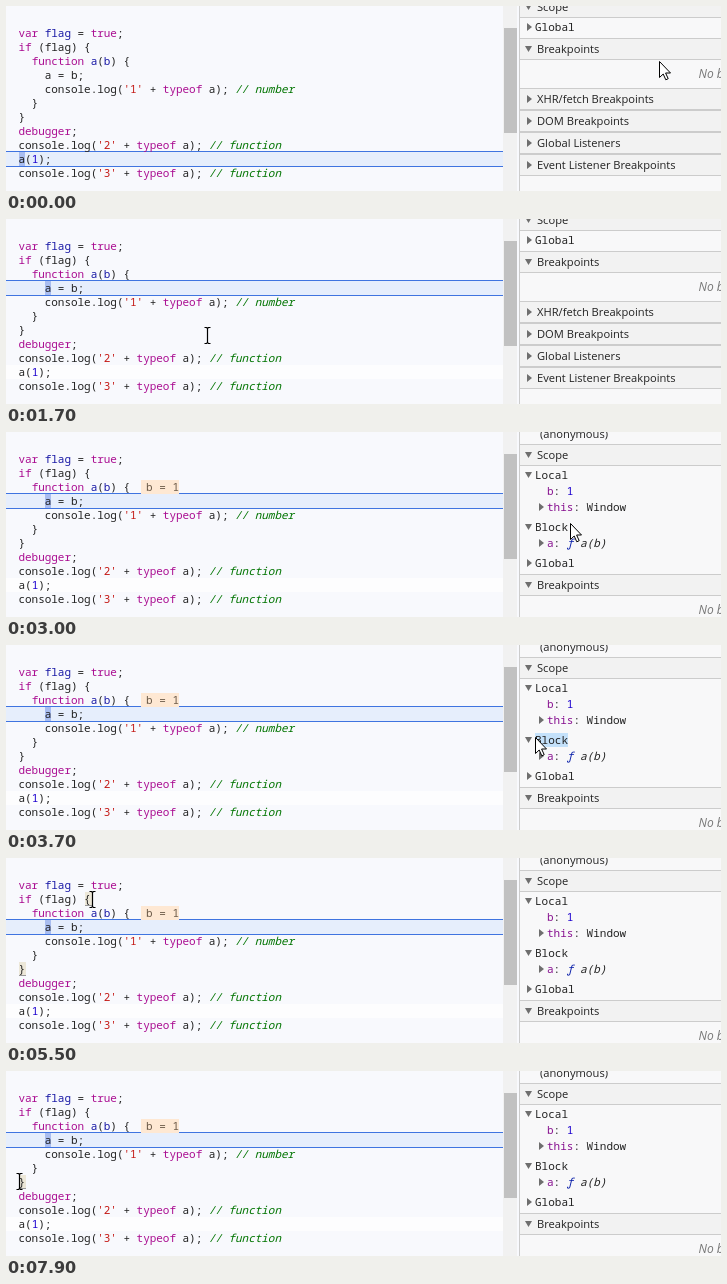
Animation of 715x185 px, one loop 8 s. Source, as an HTML page:

```html
<!DOCTYPE html>
<html lang="en">
<head>
<meta charset="utf-8">
<title>Stepping through a function in a block</title>
<style>
  html, body { margin: 0; width: 100%; height: 100%; overflow: hidden; background: #f8f9fd; }
  #stage { position: relative; width: 715px; height: 185px; overflow: hidden; color: #222; }
  #stage div, pre, svg { position: absolute; }
  pre, .mono { margin: 0; font: 11px/14px "Noto Sans Mono", monospace; white-space: pre; }
  pre { left: 12.5px; top: 20px; letter-spacing: -.04px; }
  .comment { color: #007400; font-style: italic; }
  .string { color: #c41a16; }
  .keyword { color: #aa0d91; }
  .number { color: #1c00cf; }
  .def { color: #1a1aa6; }
  .name { color: #881391; }
  .fn { color: #0d22aa; font-style: italic; }
  #exec { left: 0; width: 497px; height: 14px; background: #e6eefc; border: solid #3f74e0; border-width: 1px 0; }
  #token { top: 0; width: 6px; height: 14px; background: #a9bdf0; }
  #past { left: 0; top: 146px; width: 497px; height: 14px; background: #fdfdfe; }
  .brace { width: 7px; height: 13px; background: #ece7d8; border-bottom: 1px solid #999; }
  .picked { background: #c4e1fa; }
  #value { left: 135px; top: 48px; width: 33px; padding-left: 5px; background: #fee8d3; color: #6b5a48; }
  #track { left: 497px; top: 0; width: 14px; height: 185px; background: #f1f1f1; }
  #thumb { left: 1px; top: 22px; width: 13px; height: 105px; background: #c1c1c1; }
  #panel { left: 513px; top: 0; width: 202px; height: 185px; overflow: hidden; border-left: 1px solid #ccc; box-sizing: border-box; background: #f8f8f9; }
  #panel > div { left: -514px; width: 715px; }
  .head { left: 514px; width: 201px; height: 20px; background: #f2f2f2; border: solid #ccc; border-width: 1px 0; }
  .sans { font: 11.15px/14px "Open Sans", sans-serif; white-space: pre; }
  .note { font-size: 12px; font-style: italic; color: #777; }
  .tri { background: #6e6e6e; }
  .right { width: 5px; height: 8px; clip-path: polygon(0 0, 100% 50%, 0 100%); }
  .down { width: 7px; height: 6px; clip-path: polygon(0 0, 100% 0, 50% 100%); }
  svg { left: 0; top: 0; overflow: visible; }
</style>
</head>
<body>
<div id="stage">
  <div id="past"></div>
  <div id="exec"><div id="token"></div></div>
  <div class="brace" style="left:79px;top:34px"></div>
  <div class="brace" style="left:13px;top:104px"></div>
  <div id="openPick" class="picked" style="left:78px;top:34px;width:7px;height:14px"></div>
  <pre id="code"></pre>
  <div id="value" class="mono">b = 1</div>
  <div id="track"><div id="thumb"></div></div>
  <div id="panel">
    <div id="top"></div>
    <div id="locals"><div id="blockPick" class="picked" style="top:88px;height:14px"></div></div>
    <div id="rest"></div>
  </div>
  <svg width="1" height="1" fill="none" stroke="#000">
    <path id="arrow" d="M0 0V16L3.7 12.5L6.3 18.3L8.7 17.2L6.1 11.5H11Z" fill="#fff"/>
    <path id="beam" d="M-3 -8H-1L0 -7L1 -8H3M0 -7V7M-3 8H-1L0 7L1 8H3" stroke-width="1.2"/>
  </svg>
</div>
<script>
const $ = id => document.getElementById(id);
const source = `var flag = true;
if (flag) {
  function a(b) {
    a = b;
    console.log('1' + typeof a); // number
  }
}
debugger;
console.log('2' + typeof a); // function
a(1);
console.log('3' + typeof a); // function`;
const kinds = ['comment', 'string', 'keyword', 'def', 'number'];
$('code').innerHTML = source.replace(
  /(\/\/.*)|('.')|\b(var|true|if|function|typeof|debugger)\b|((?<=var |function |a\()[a-z]+)|(\d)/g,
  (text, ...groups) => `<span class="${kinds[groups.findIndex(g => g === text)]}">${text}</span>`);

// Sidebar pieces; y is the middle of the row.
const add = (parent, cls, x, y, html = '') =>
  $(parent).insertAdjacentHTML('beforeend', `<div class="${cls}" style="left:${x}px;top:${y}px">${html}</div>`);
const label = (parent, cls, x, y, html) => add(parent, cls, x, y - 7, html);
const triangle = (parent, dir, x, y) =>
  dir === 'down' ? add(parent, 'tri down', x - 4, y - 3) : add(parent, 'tri right', x - 2, y - 4);
function header(parent, y, text, dir = 'right') {
  add(parent, 'head', 514, y - 11);
  triangle(parent, dir, 523, y);
  label(parent, 'sans', 531, y, text);
}
function entry(parent, x, y, html, dir) {
  if (dir) triangle(parent, dir, x - 6, y);
  label(parent, 'mono', x, y, html);
}

label('top', 'sans', 534, 2, '(anonymous)');
header('top', 23, 'Scope', 'down');
entry('locals', 529, 43, 'Local', 'down');
entry('locals', 541, 59, '<span class="name">b</span>: <span class="number">1</span>');
entry('locals', 541, 75, '<span class="name">this</span>: Window', 'right');
entry('locals', 529, 95, 'Block', 'down');
entry('locals', 541, 111, '<span class="name">a</span>: <span class="fn">ƒ</span> <i>a(b)</i>', 'right');
entry('rest', 529, 131, 'Global', 'right');
header('rest', 153, 'Breakpoints', 'down');
label('rest', 'sans note', 692.5, 178, 'No breakpoints');
['XHR/fetch Breakpoints', 'DOM Breakpoints', 'Global Listeners', 'Event Listener Breakpoints']
  .forEach((text, i) => header('rest', 203 + 22 * i, text));

// Pointer moves: start, end, target x, target y
const moves = [
  [0, 400, 343, 125], [400, 600, 201, 116],
  [2000, 2300, 547, 114], [2400, 2800, 564, 91], [3000, 3900, 529, 92],
  [4100, 4500, 63, 29], [4500, 4700, 89, 40], [4800, 5200, 82, 40], [5300, 5900, 88, 42],
  [6500, 7400, 17, 112], [7400, 7600, 13, 110]
];
function pointerAt(t) {
  let x = 653, y = 55;
  for (const [from, to, tx, ty] of moves) {
    const k = Math.min(1, Math.max(0, (t - from) / (to - from)));
    const eased = 1 - (1 - k) ** 3;
    x += (tx - x) * eased;
    y += (ty - y) * eased;
  }
  return [Math.round(x), Math.round(y)];
}
const show = (el, on) => { el.style.visibility = on ? 'visible' : 'hidden'; };
const braces = document.querySelectorAll('.brace');
const start = performance.now();

function draw() {
  const t = Math.floor((performance.now() - start) % 8000 / 100) * 100;
  const inside = t >= 1700, scoped = t >= 1800;
  const matching = t >= 1400 && t < 1700 || t >= 5400 && t < 5700;

  $('exec').style.top = (inside ? 61 : 145) + 'px';
  $('token').style.left = (inside ? 39 : 13) + 'px';
  show($('past'), inside);
  show($('value'), scoped);
  show($('locals'), scoped);
  $('top').style.top = (scoped ? 0 : -22) + 'px';
  $('rest').style.top = (scoped ? 0 : -110) + 'px';

  show(braces[0], matching);
  show(braces[1], matching || t >= 7400);
  show($('openPick'), t >= 5700 && t < 7400);

  const [x, y] = pointerAt(t);
  // The word is selected by dragging leftwards, letter by letter.
  const dragged = Math.min(5, Math.max(0, Math.round((562 - x) / 6.6)));
  const letters = t > 3000 && t < 5400 ? dragged : 0;
  $('blockPick').style.left = 562 - letters * 6.6 + 'px';
  $('blockPick').style.width = letters * 6.6 + 'px';

  const overPanel = x > 498;
  show($('arrow'), overPanel);
  show($('beam'), !overPanel);
  for (const id of ['arrow', 'beam']) $(id).setAttribute('transform', `translate(${x + .5} ${y + .5})`);
  requestAnimationFrame(draw);
}
draw();
</script>
</body>
</html>
```
